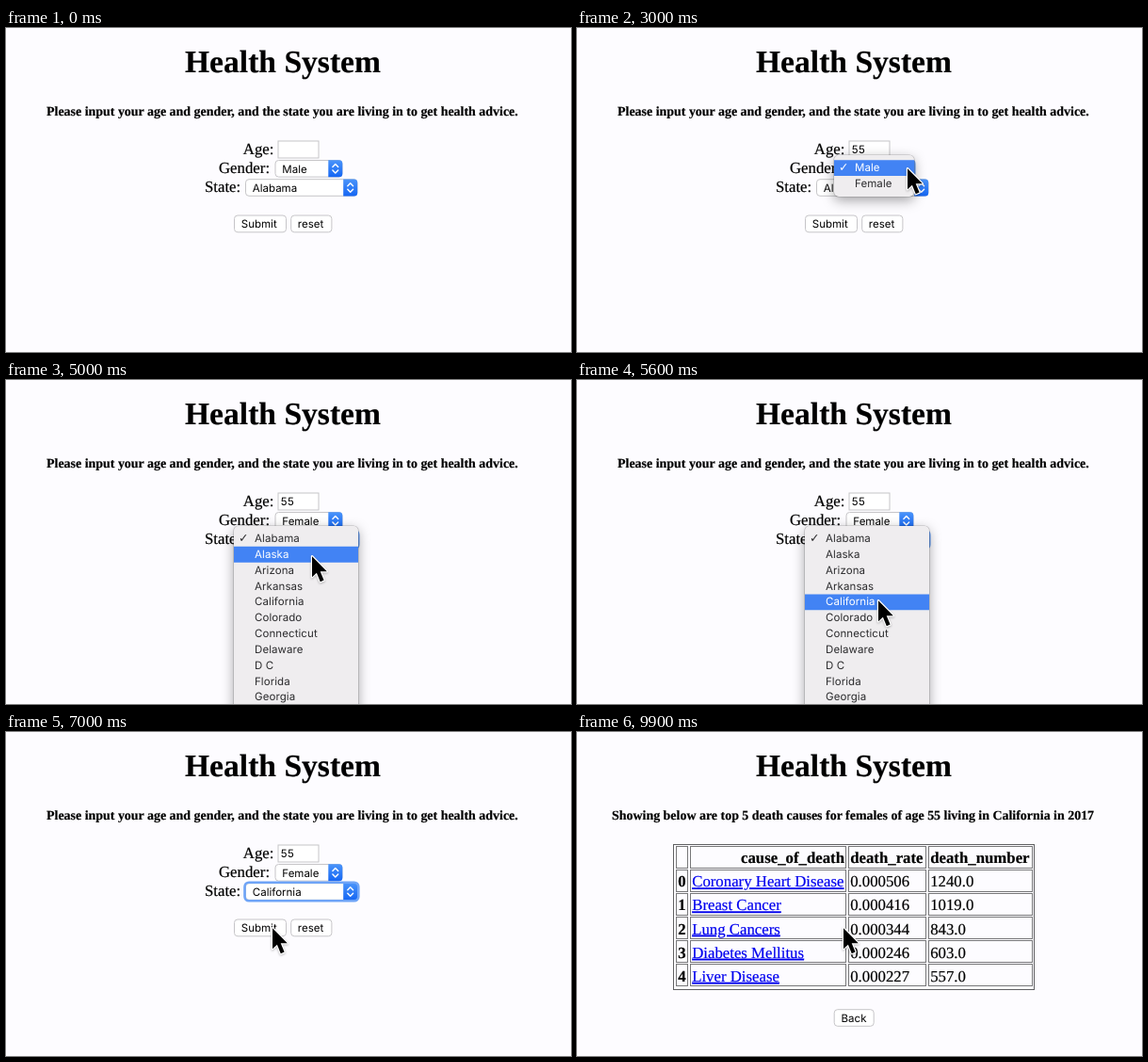
An HTML page that plays this animation: 600x344 px, repeating every 10000 ms.

```html
<!DOCTYPE html>
<html lang="en">
<head>
<meta charset="utf-8">
<title>Health System</title>
<style>
html, body { margin: 0; width: 100%; height: 100%; overflow: hidden; background: #fdfcff; }
#stage {
  position: relative; width: 100%; height: 100%; overflow: clip; contain: strict;
  text-rendering: geometricPrecision;
}
svg { position: absolute; left: 0; top: 0; width: 100%; height: 100%; overflow: hidden; }
text {
  font: 16.8px "Liberation Serif", "Times New Roman", serif;
  fill: #000; stroke: #000; stroke-width: .2; white-space: pre;
}
.title { font-size: 33.6px; font-weight: bold; }
.lead { font-size: 13.95px; font-weight: bold; }
.bold { font-weight: bold; }
.link { fill: #0000ee; stroke: #0000ee; text-decoration: underline; }
.ui, .menu { font: 11.5px Inter, "Open Sans", sans-serif; }
.ui { stroke: none; }
.box { fill: #fff; stroke: #c6c5c8; }
.ring { fill: none; stroke: #6ea4f7; stroke-width: 2.6; }
.cell, .frame { fill: none; stroke: #777779; }
.frame { stroke: #606063; }

/* Everything shares one clock and changes on 100 ms ticks. */
.anim { animation: 10s step-end infinite; }

.form { animation-name: form; }
.result { animation-name: result; }
@keyframes form { 0% { opacity: 1 } 78% { opacity: 0 } }
@keyframes result { 0% { opacity: 0 } 78% { opacity: 1 } }

.age-focus { animation-name: age-focus; }
.gender-focus { animation-name: gender-focus; }
.state-focus { animation-name: state-focus; }
@keyframes age-focus { 0% { opacity: 0 } 10% { opacity: 1 } 28% { opacity: 0 } }
@keyframes gender-focus { 0% { opacity: 0 } 28% { opacity: 1 } 44% { opacity: 0 } }
@keyframes state-focus { 0% { opacity: 0 } 44% { opacity: 1 } 74% { opacity: 0 } }

.caret { animation-name: caret; }
@keyframes caret {
  0% { opacity: 0; transform: none }
  10% { opacity: 1; transform: none }
  15% { opacity: 0; transform: none }
  19% { opacity: 1; transform: translateX(7.5px) }
  20% { opacity: 1; transform: translateX(15.5px) }
  25% { opacity: 0; transform: none }
}
.digit1 { animation-name: digit1; }
.digit2 { animation-name: digit2; }
@keyframes digit1 { 0% { opacity: 0 } 19% { opacity: 1 } }
@keyframes digit2 { 0% { opacity: 0 } 20% { opacity: 1 } }

.male { animation-name: male; }
.female { animation-name: female; }
.alabama { animation-name: alabama; }
.california { animation-name: california; }
@keyframes male { 0% { opacity: 1 } 39% { opacity: 0 } }
@keyframes female { 0% { opacity: 0 } 39% { opacity: 1 } }
@keyframes alabama { 0% { opacity: 1 } 63% { opacity: 0 } }
@keyframes california { 0% { opacity: 0 } 63% { opacity: 1 } }

.pressed { animation-name: pressed; }
@keyframes pressed { 0% { opacity: 0 } 74% { opacity: 1 } 75% { opacity: 0 } }

.menu {
  --row: 16.85px;
  position: absolute; padding: 5px 0; border-radius: 5px;
  background: #efedef; color: #2c2c2e;
  box-shadow: 0 0 0 .6px rgba(0, 0, 0, .22), 0 4px 13px rgba(0, 0, 0, .36);
  line-height: var(--row); letter-spacing: .08px; white-space: pre;
}
.row { height: var(--row); padding-left: 22px; position: relative; }
.row:first-child::before {
  content: "✓"; position: absolute; left: 5px;
  font: bold 12.5px/16.85px "DejaVu Sans", sans-serif;
}
.hot {
  position: absolute; left: 0; right: 0; top: 5px; background: #4283f4; color: #fff;
  clip-path: inset(calc(var(--r) * var(--row)) 0 calc(100% - (var(--r) + 1) * var(--row)) 0);
}
#genders { left: 273px; top: 135.2px; width: 85px; animation-name: gender-menu; }
#states { left: 242px; top: 155px; width: 132px; animation-name: state-menu; }
#genders .hot { animation-name: gender-row; }
#states .hot { animation-name: state-row; }
@keyframes gender-menu { 0% { opacity: 0 } 29% { opacity: 1 } 38% { opacity: .5 } 39% { opacity: 0 } }
@keyframes state-menu { 0% { opacity: 0 } 44% { opacity: 1 } 62% { opacity: .5 } 63% { opacity: 0 } }
@keyframes gender-row { 0% { --r: 0 } 33% { --r: 1 } 36% { --r: -1 } 37%, 100% { --r: 1 } }
@keyframes state-row {
  0% { --r: 0 } 49% { --r: 1 } 51% { --r: 2 } 54% { --r: 3 }
  56% { --r: 4 } 60% { --r: -1 } 61%, 100% { --r: 4 }
}

.pointer { animation: move 10s infinite; }
@keyframes move {
  0% { transform: translate(378px, 266px); animation-timing-function: steps(1) }
  1% { transform: translate(378px, 266px); animation-timing-function: steps(5) }
  6% { transform: translate(336px, 165px); animation-timing-function: steps(4) }
  10% { transform: translate(331px, 121px); animation-timing-function: steps(1) }
  23% { transform: translate(331px, 121px); animation-timing-function: steps(4) }
  27% { transform: translate(350px, 148px); animation-timing-function: steps(1) }
  31% { transform: translate(350px, 148px); animation-timing-function: steps(3) }
  34% { transform: translate(327px, 162px); animation-timing-function: steps(1) }
  39% { transform: translate(327px, 162px); animation-timing-function: steps(4) }
  43% { transform: translate(348px, 168px); animation-timing-function: steps(1) }
  48% { transform: translate(348px, 168px); animation-timing-function: steps(2) }
  50% { transform: translate(324px, 186px); animation-timing-function: steps(6) }
  56% { transform: translate(319px, 233px); animation-timing-function: steps(2) }
  58% { transform: translate(318px, 236px); animation-timing-function: steps(1) }
  63% { transform: translate(318px, 236px); animation-timing-function: steps(7) }
  70%, 100% { transform: translate(282px, 207px); animation-timing-function: steps(1) }
}
.arrow {
  animation-name: arrow; fill: #000; stroke: #fff; stroke-width: 2.4;
  paint-order: stroke; stroke-linejoin: round;
  filter: drop-shadow(0 1px 1px rgba(0, 0, 0, .25));
}
@keyframes arrow { 0% { opacity: 0 } 1% { opacity: 1 } 18% { opacity: 0 } 23% { opacity: 1 } }
</style>
</head>
<body>
<div id="stage">
<svg>
  <defs>
    <linearGradient id="blue" x2="0" y2="1">
      <stop stop-color="#4a94fa"/><stop offset="1" stop-color="#1566f3"/>
    </linearGradient>
    <g id="cap">
      <path d="M0 0H11.5a3.5 3.5 0 0 1 3.5 3.5V14.5a3.5 3.5 0 0 1 -3.5 3.5H0z" fill="url(#blue)"/>
      <path d="M4.6 7.2L7.5 4.2L10.4 7.2M4.6 10.8L7.5 13.8L10.4 10.8" fill="none" stroke="#fff"
        stroke-width="1.4" stroke-linecap="round" stroke-linejoin="round"/>
    </g>
  </defs>

  <text class="title" x="190" y="47.3">Health System</text>

  <g class="anim form">
    <text class="lead" x="43" y="92.6">Please input your age and gender, and the state you are living in to get health advice.</text>
    <text x="251.8" y="134">Age:</text>
    <text x="226" y="154">Gender:</text>
    <text x="211" y="174">State:</text>

    <rect class="box" x="289" y="120" width="43" height="18"/>
    <g class="anim age-focus">
      <rect class="ring" x="287.6" y="118.6" width="45.4" height="20" rx="2"/>
      <rect x="318.5" y="122.5" width="8.4" height="13" rx="3" fill="#fafafa" stroke="#d2d2d4" stroke-width=".8"/>
      <path d="M321 127L322.7 125L324.4 127M321 131L322.7 133L324.4 131" fill="none" stroke="#555"/>
    </g>
    <text class="ui anim digit1" x="291.8" y="133.4">5</text>
    <text class="ui anim digit2" x="299" y="133.4">5</text>
    <rect class="anim caret" x="291.2" y="122" width="1" height="14"/>

    <rect class="box" x="286" y="140.5" width="71" height="17.6" rx="3.5"/>
    <use href="#cap" x="342.3" y="140.3"/>
    <rect class="ring anim gender-focus" x="285" y="139.5" width="73.3" height="19.6" rx="4.5"/>
    <text class="ui anim male" x="293.3" y="153.6">Male</text>
    <text class="ui anim female" x="293.3" y="153.6">Female</text>

    <rect class="box" x="254.5" y="160.7" width="118.5" height="17.6" rx="3.5"/>
    <use href="#cap" x="358.2" y="160.5"/>
    <rect class="ring anim state-focus" x="253.5" y="159.7" width="120.8" height="19.6" rx="4.5"/>
    <text class="ui anim alabama" x="261.8" y="173.8">Alabama</text>
    <text class="ui anim california" x="261.8" y="173.8">California</text>

    <rect class="box" x="242.5" y="199" width="55" height="17.8" rx="3.5"/>
    <text class="ui" x="249.8" y="212.4">Submit</text>
    <g class="anim pressed">
      <rect x="242" y="198.5" width="56" height="18.8" rx="3.5" fill="url(#blue)"/>
      <text class="ui" x="249.8" y="212.4" style="fill:#fff">Submit</text>
    </g>
    <rect class="box" x="302.7" y="199" width="43.2" height="17.8" rx="3.5"/>
    <text class="ui" x="309.8" y="212.4">reset</text>
  </g>

  <g class="anim result">
    <text class="lead" x="37" y="92.6">Showing below are top 5 death causes for females of age 55 living in California in 2017</text>
    <rect class="frame" x="102.5" y="119.5" width="383" height="154"/>
    <g id="table"></g>
    <rect class="box" x="273.2" y="294.7" width="42" height="17.6" rx="3.5"/>
    <text class="ui" x="280.6" y="308">Back</text>
  </g>
</svg>

<div id="genders" class="menu anim"></div>
<div id="states" class="menu anim"></div>

<svg>
  <g class="pointer">
    <path class="anim arrow" d="M1 1.2V23.2L5.9 18.7L9.8 28.2L13.6 26.6L9.7 17.3H16.8z"/>
  </g>
</svg>
</div>

<script>
const byId = id => document.getElementById(id);

function fillMenu(id, names) {
  const rows = names.map(name => `<div class="row">${name}</div>`).join("");
  byId(id).innerHTML = rows + `<div class="hot anim">${rows}</div>`;
}
fillMenu("genders", ["Male", "Female"]);
fillMenu("states", ["Alabama", "Alaska", "Arizona", "Arkansas", "California", "Colorado",
  "Connecticut", "Delaware", "D C", "Florida", "Georgia", "Hawaii", "Idaho"]);

const columns = [[105.5, 12], [120.5, 165], [288.5, 82], [373.5, 110]];
const rows = [
  ["", "cause_of_death", "death_rate", "death_number"],
  ["0", "Coronary Heart Disease", "0.000506", "1240.0"],
  ["1", "Breast Cancer", "0.000416", "1019.0"],
  ["2", "Lung Cancers", "0.000344", "843.0"],
  ["3", "Diabetes Mellitus", "0.000246", "603.0"],
  ["4", "Liver Disease", "0.000227", "557.0"]
];
byId("table").innerHTML = rows.map((row, r) => row.map((value, c) => {
  const [x, width] = columns[c];
  const y = 122 + r * 25.15;
  const kind = r === 0 || c === 0 ? "bold" : c === 1 ? "link" : "";
  const toRight = r === 0 && c === 1;
  return `<rect class="cell" x="${x}" y="${Math.floor(y) - 0.5}" width="${width}" height="23"/>
    <text class="${kind}" x="${toRight ? x + width - 1.5 : x + 1.7}" y="${y + 17.1}"
      text-anchor="${toRight ? "end" : "start"}">${value}</text>`;
}).join("")).join("");
</script>
</body>
</html>
```
